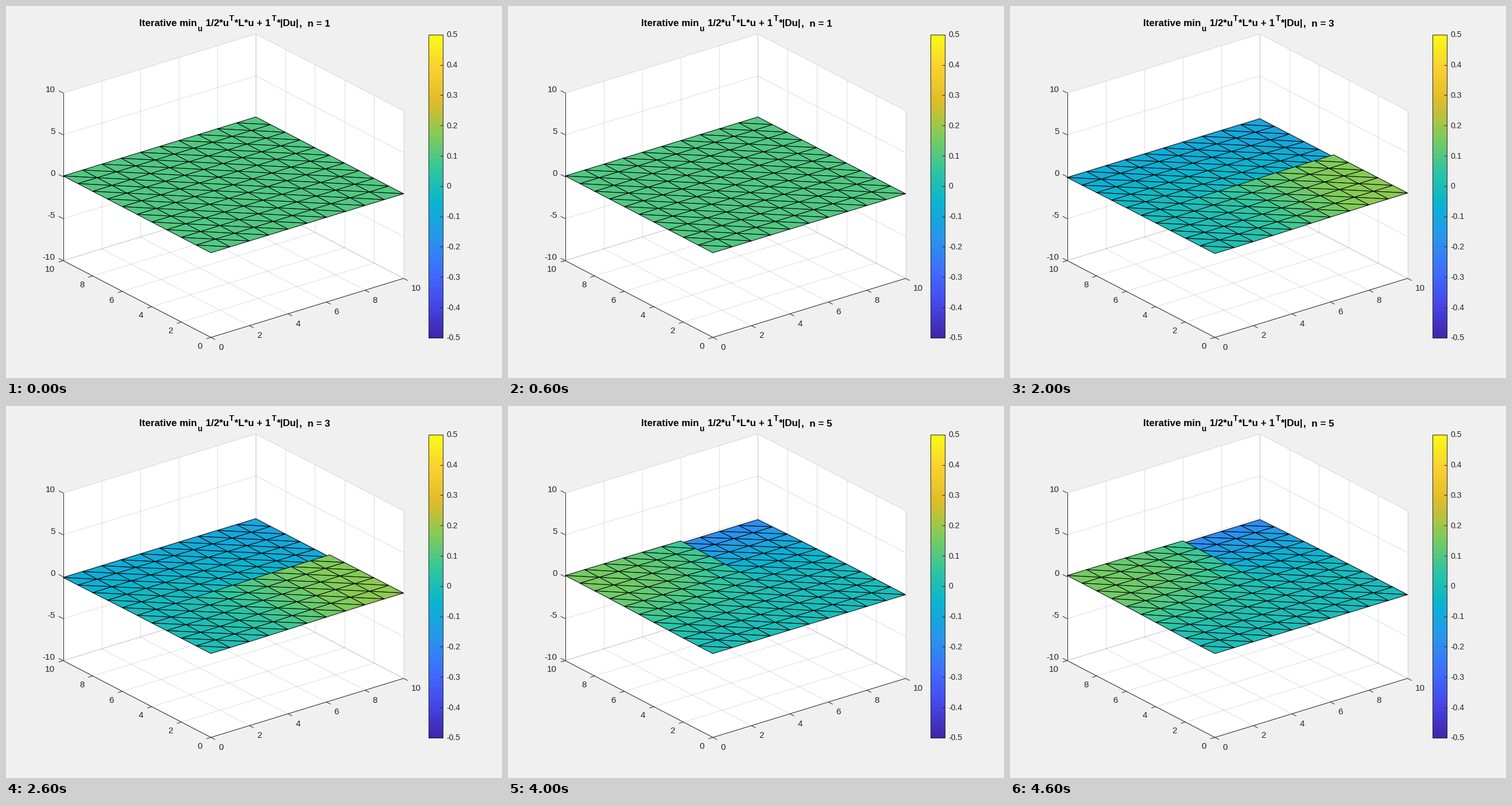
These frames come from a looping animation (864 by 648 pixels, 5000 ms). A matplotlib script:

```python
import numpy as np
import matplotlib.pyplot as plt
from matplotlib.animation import FuncAnimation
from matplotlib.collections import LineCollection, PolyCollection
from matplotlib.colors import LinearSegmentedColormap, Normalize
from matplotlib.patches import Rectangle

W, H, DPI = 864, 648, 100
PX = 72 / DPI
INK = "#262626"
CMAP = LinearSegmentedColormap.from_list("heat", [
    "#3e26a8", "#4747eb", "#3e6fff", "#2797eb", "#08b5d0",
    "#31c69f", "#81cc59", "#dcbd29", "#fccf30", "#f9fb15"])
NORM = Normalize(-0.5, 0.5)

plt.rcParams["font.family"] = "Liberation Sans"
fig = plt.figure(figsize=(W / DPI, H / DPI), dpi=DPI, facecolor="#f0f0f0")
ax = fig.add_axes([0, 0, 1, 1])


def project(x, y, z):
    """Orthographic view of the 10 x 10 x 20 box in stage pixels."""
    x, y, z = np.broadcast_arrays(x, y, z)
    return np.stack([356.9 + 33.56 * x - 25.73 * y,
                     577.3 - 10.28 * x - 13.38 * y - 14.6 * (z + 10)], axis=-1)


def smooth(t):
    t = np.clip(t, 0, 1)
    return t * t * (3 - 2 * t)


def square(t):
    return np.clip(t, 0, 1) ** 2


def label(x, y, s, size=15.2, ha="left", va="center_baseline", color=INK, **kw):
    return ax.text(x, y, s, fontsize=size * PX, ha=ha, va=va, color=color, **kw)


def lines(segs, z, **kw):
    ax.add_collection(LineCollection(segs, linewidths=PX, colors=INK, zorder=z, **kw))


def make_mesh(n=10):
    """Cells split along one diagonal, ordered from back to front."""
    half = np.array([(0, 0), (1, 0), (0, 1)])
    tris = np.array([(i, j) + part for i in range(n) for j in range(n)
                     for part in (half, 1 - half)], float)
    return tris[np.argsort(-tris.sum(axis=(1, 2)), kind="stable")]


MESH = make_mesh()
X, Y = MESH[..., 0], MESH[..., 1]
CX, CY = (c.mean(axis=1, keepdims=True) for c in (X, Y))


def flat():
    return np.full_like(X, 0.1)


def corner_patch():
    inside = (CX < 3) & (CY < 4) & (CX + CY < 5)
    return np.where(inside, 0.295, -0.035) + 0 * X


def right_tear():
    low = 0.01 - 0.005 * Y + 0.175 * smooth((X - 1) / 8)
    t = Y / 5 - 1
    high = -0.015 - 0.07 * smooth(t) - 0.09 * square((X - 2) / 8) * (1 - 0.7 * t)
    return np.where(CY < 5, low, high)


def two_patches():
    blue = (CX > 4) & (CX < 7) & (CY < 3) & (CX + CY < 9)
    gold = (CX > 7) & (CY < 2)
    return np.where(gold, 0.275, np.where(blue, -0.28, 0.01)) + 0 * X


def back_tear():
    left = 0.15 * smooth((Y - 1) / 7) * (1 - 0.6 * (X / 6) ** 2)
    right = -0.01 - 0.2 * square((Y - 2) / 8)
    mix = smooth((X - 3) / 6)
    fade = np.clip(1 - (Y - 5) / 3, 0, 1)  # the tear opens beyond y = 5
    mix = np.where(CX < 6, mix * fade, 1 - (1 - mix) * fade)
    return left + (right - left) * mix


FIELDS = [f() for f in (flat, corner_patch, right_tear, two_patches, back_tear)]


def draw_box():
    a, b = np.array([0, 10, 10, 0]), np.array([0, 0, 10, 10])
    walls = [project(a, b, -10), project(a, 10, 2 * b - 10), project(10, a, 2 * b - 10)]
    ax.add_collection(PolyCollection(walls, facecolors="white", zorder=0))

    e = np.array([0, 10])
    grid = []
    axes = [project(e, 0, -10), project(0, e, -10), project(0, 10, 2 * e - 10)]

    def tick(p, dx, dy):
        axes.append([p, p + (dx, dy)])

    for t in range(0, 11, 2):
        grid += [project(t, e, -10), project(t, 10, 2 * e - 10),
                 project(e, t, -10), project(10, t, 2 * e - 10)]
        p = project(t, 0, -10)
        tick(p, 7.3, 3.8)
        label(*p + (13.2, 16), t)
        p = project(0, t, -10)
        tick(p, -7.8, 2.4)
        label(*p + (-14.6, 14), t, ha="right")
    for z in range(-10, 11, 5):
        grid += [project(e, 10, z), project(10, e, z)]
        p = project(0, 10, z)
        tick(p, -7.8, -4)
        label(*p + (-14.2, -6.6), z, ha="right")
    lines(grid, 1, alpha=0.15)
    lines(axes, 2)


def draw_colorbar(x0=736, x1=761, top=49.8, bottom=577.8):
    ax.imshow(np.linspace(1, 0, 256)[:, None], cmap=CMAP, aspect="auto",
              extent=(x0, x1, bottom, top), interpolation="nearest", zorder=3)
    ax.add_patch(Rectangle((x0, top), x1 - x0, bottom - top, fill=False,
                           ec=INK, lw=PX, zorder=4))
    marks = []
    for v in np.linspace(-0.5, 0.5, 11):
        y = top + (bottom - top) * (0.5 - v)
        marks.append([(x1 - 5, y), (x1, y)])
        label(767, y - 0.8, f"{round(v, 1) + 0:g}", 14)
    lines(marks, 4)


def draw_title(x=232, y=35, size=17):
    """Lay out the pieces one after another; ^ raises and _ lowers a piece."""
    for piece in ("Iterative min", "_u", " 1/2*u", "^T", "*L*u + 1", "^T", "*|Du|"):
        shift = {"_": 9, "^": -9}.get(piece[0], 0)
        text = label(x, y + shift, piece.lstrip("_^"), size * (0.8 if shift else 1),
                     va="baseline", color="black", weight="bold")
        x += text.get_window_extent().width + 1
    return label(x, y, "", size, va="baseline", color="black", weight="bold")


ax.set(xlim=(0, W), ylim=(H, 0))
draw_box()
draw_colorbar()
counter = draw_title()
surface = PolyCollection([], edgecolors="black", linewidths=PX, joinstyle="round", zorder=5)
ax.add_collection(surface)
ax.set(xlim=(0, W), ylim=(H, 0))
ax.axis("off")


def update(i):
    u = FIELDS[i]
    surface.set_verts(project(X, Y, u))
    surface.set_facecolor(CMAP(NORM(u.mean(axis=1))))
    counter.set_text(f",  n = {i + 1}")
    return surface, counter


anim = FuncAnimation(fig, update, frames=len(FIELDS), interval=1000,
                     repeat=True, repeat_delay=0, blit=False)
plt.show()
```
